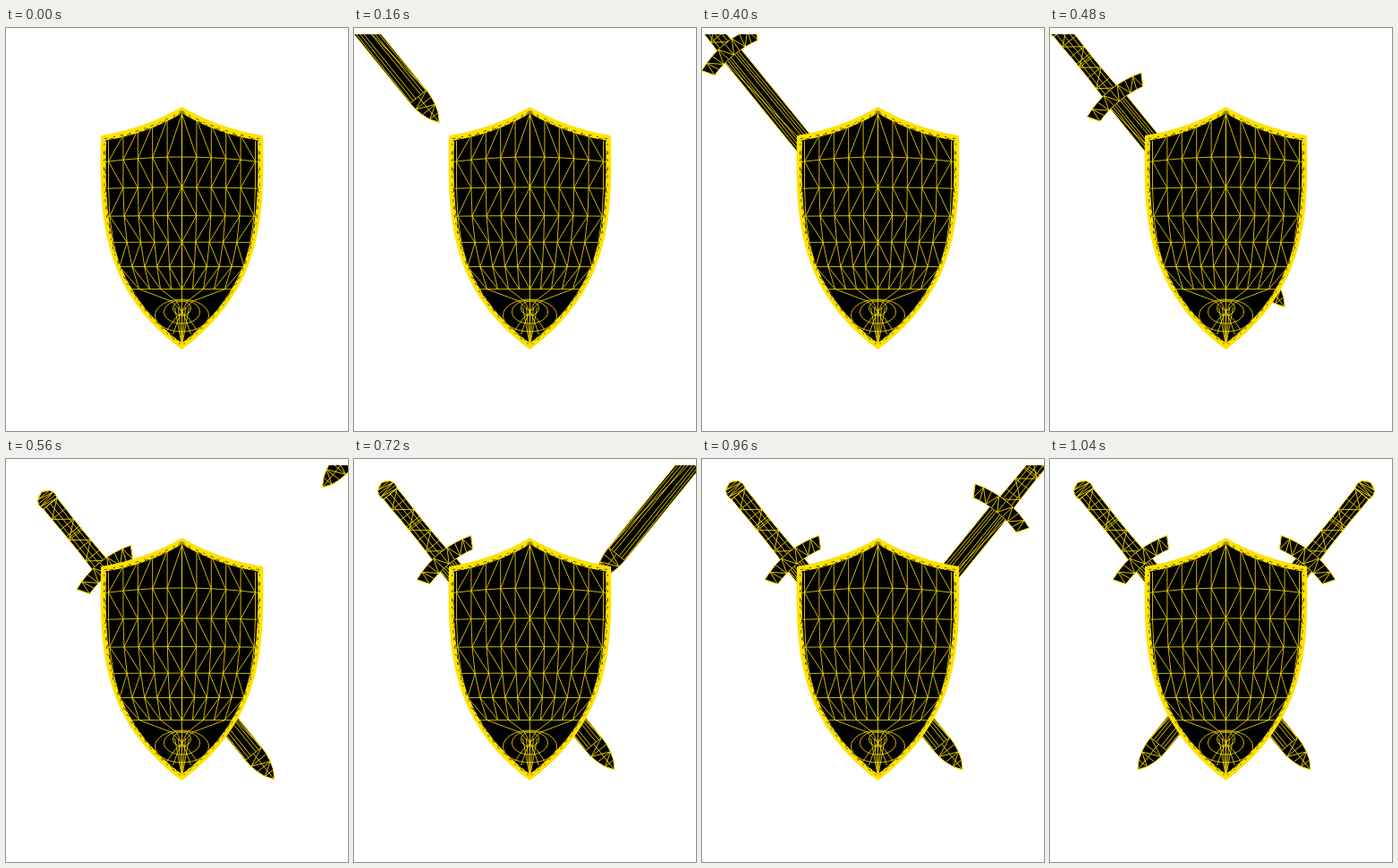
An HTML page with a canvas for the animation above (1840 ms loop, 382x450 px).

```html
<!DOCTYPE html>
<html lang="en">
<head>
<meta charset="utf-8">
<title>Shield and swords</title>
<style>
  html, body { margin: 0; width: 100%; height: 100%; overflow: hidden; background: #fff; }
  canvas { display: block; }
</style>
</head>
<body>
<canvas id="stage" width="382" height="450"></canvas>
<script>
const ctx = document.getElementById('stage').getContext('2d');
const YELLOW = '#ffe200', CX = 196.5;
const STEP = 80, LOOP = 1840, LAST = 13;

const range = (from, to, step = 1) =>
  Array.from({ length: Math.floor((to - from) / step + 1.001) }, (_, i) => from + i * step);

function line(...points) {
  ctx.beginPath();
  points.forEach(p => ctx.lineTo(...p));
  ctx.stroke();
}

// A filled band between two edges, divided into triangles.
function band(a, b) {
  ctx.beginPath();
  [...a, ...b.slice().reverse()].forEach(p => ctx.lineTo(...p));
  ctx.closePath();
  ctx.fill();
  ctx.stroke();
  a.forEach((p, i) => {
    line(p, b[i]);
    if (i) line(i % 2 ? a[i - 1] : b[i - 1], i % 2 ? b[i] : p);
  });
}

// Half widths along the sword, measured from its tip.
const bladeHalf = u => 11.7 * Math.sin(Math.PI / 2 * Math.min(1, u / 37)) ** .7;
const gripHalf = u => u > 396 ? Math.sqrt(Math.max(0, 121 - (u - 402) ** 2)) : 9.3 + ((u - 350) / 46) ** 2;

function profile(us, half) {
  band(us.map(u => [u, half(u)]), us.map(u => [u, -half(u)]));
}

// Local x runs from the tip back to the pommel, local y across the blade.
function sword(away, flip) {
  ctx.save();
  ctx.beginPath();
  ctx.rect(0, 7, 382, 443);
  ctx.clip();
  if (flip) ctx.transform(-1, 0, 0, 1, 389, 0);
  ctx.transform(-.6306, -.7761, .7761, -.6306, 291 - 41.75 * away, 347 - 51.5 * away);
  ctx.fillStyle = '#000';
  ctx.strokeStyle = YELLOW;
  ctx.lineWidth = .8;

  profile([...range(0, 37, 37 / 4), 302], bladeHalf);
  line([0, 0], [37, 0]);
  for (const k of [-3, -2, -1, 1, 2, 3]) line([37, k * 3.6], [302, k * 2.6]);

  profile(range(307, 412, 15), gripHalf);
  profile(range(397, 413, 4), gripHalf);
  for (const k of [-.6, 0, .6]) line(...range(307, 397, 15).map(u => [u, k * gripHalf(u)]));
  for (const u of [354, 357]) line([u, 11], [u, -11]);

  const ts = range(-1, 1, .25);
  band(ts.map(t => [295 - 4 * t * t, 31 * t + 1.5]), ts.map(t => [311 - 7 * t * t, 39 * t + 1.5]));
  ctx.restore();
}

function outline(inset) {
  const sx = 1 - inset / 90.5, sy = 1 - inset * 1.2 / 135.5;
  const p = (x, y) => [CX + x * sx, 223 + (y - 223) * sy];
  ctx.beginPath();
  for (const s of [-1, 1]) {
    ctx.moveTo(...p(0, 88));
    ctx.quadraticCurveTo(...p(s * 41, 112), ...p(s * 90.5, 120));
    ctx.bezierCurveTo(...p(s * 92.5, 210), ...p(s * 90.5, 292), ...p(0, 359));
    ctx.lineTo(...p(0, 88));
  }
}

// Grid point of the shield: row 0 follows the top edge, lower rows flatten and narrow.
function vertex(row, i) {
  const t = i / 5, k = row - 1;
  const y = row ? 144 + 35 * k - 1.1 * k * k : 96;
  const half = 82 - 22 * Math.max(0, (y - 170) / 121) ** 2.5;
  return [CX + half * t, y + (row ? 5 * t * t / row ** 2 : 30 * Math.abs(t))];
}

function mesh() {
  for (const r of range(0, 6)) {
    if (r) line(...range(-6, 6).map(i => vertex(r, i)));
    if (r === 6) break;
    for (const i of range(-5, 5)) {
      const inner = i - Math.sign(i);
      line(vertex(r, i), vertex(r + 1, i));
      if (r % 2) line(vertex(r, i), vertex(r + 1, inner));
      else line(vertex(r, inner), vertex(r + 1, i));
    }
  }
  // Fan and rings around the lower pole
  for (const i of range(-4, 4, 2)) {
    line(vertex(6, i), [CX + i * 3, 305], [CX - i * 2, 325], [CX - i * 5, 342]);
    line([CX + i * 2, 312], [CX, 355]);
  }
  for (const k of [1, 2, 3]) {
    ctx.beginPath();
    ctx.ellipse(CX, 309 + 4 * k, 10 * k, 3 + 5 * k, 0, 0, 7);
    ctx.stroke();
  }
}

function shield() {
  ctx.save();
  outline(0);
  ctx.fillStyle = YELLOW;
  ctx.fill();
  outline(6);
  ctx.fillStyle = '#000';
  ctx.fill();
  // Dark flecks where the dense rim mesh leaves gaps
  ctx.lineWidth = .8;
  for (const inset of [3.4, 4.8]) {
    ctx.setLineDash([inset, 9 - inset, 2, inset * 2]);
    outline(inset);
    ctx.save();
    ctx.clip();
    outline(inset + .4);
    ctx.stroke();
    ctx.restore();
  }
  ctx.setLineDash([]);
  outline(6);
  ctx.clip();
  ctx.strokeStyle = YELLOW;
  mesh();
  ctx.restore();
}

function draw(now) {
  const n = Math.min(LAST, Math.floor(now % LOOP / STEP));
  ctx.fillStyle = '#fff';
  ctx.fillRect(0, 0, 382, 450);
  // The first sword overshoots once, then settles.
  if (n > 0) sword(n > 7 ? 0 : Math.max(-.21, 6.69 - n), false);
  if (n > 6) sword(n === LAST ? 0 : 13.12 - n, true);
  shield();
}

function tick() {
  draw(performance.now());
  requestAnimationFrame(tick);
}
tick();
</script>
</body>
</html>
```
